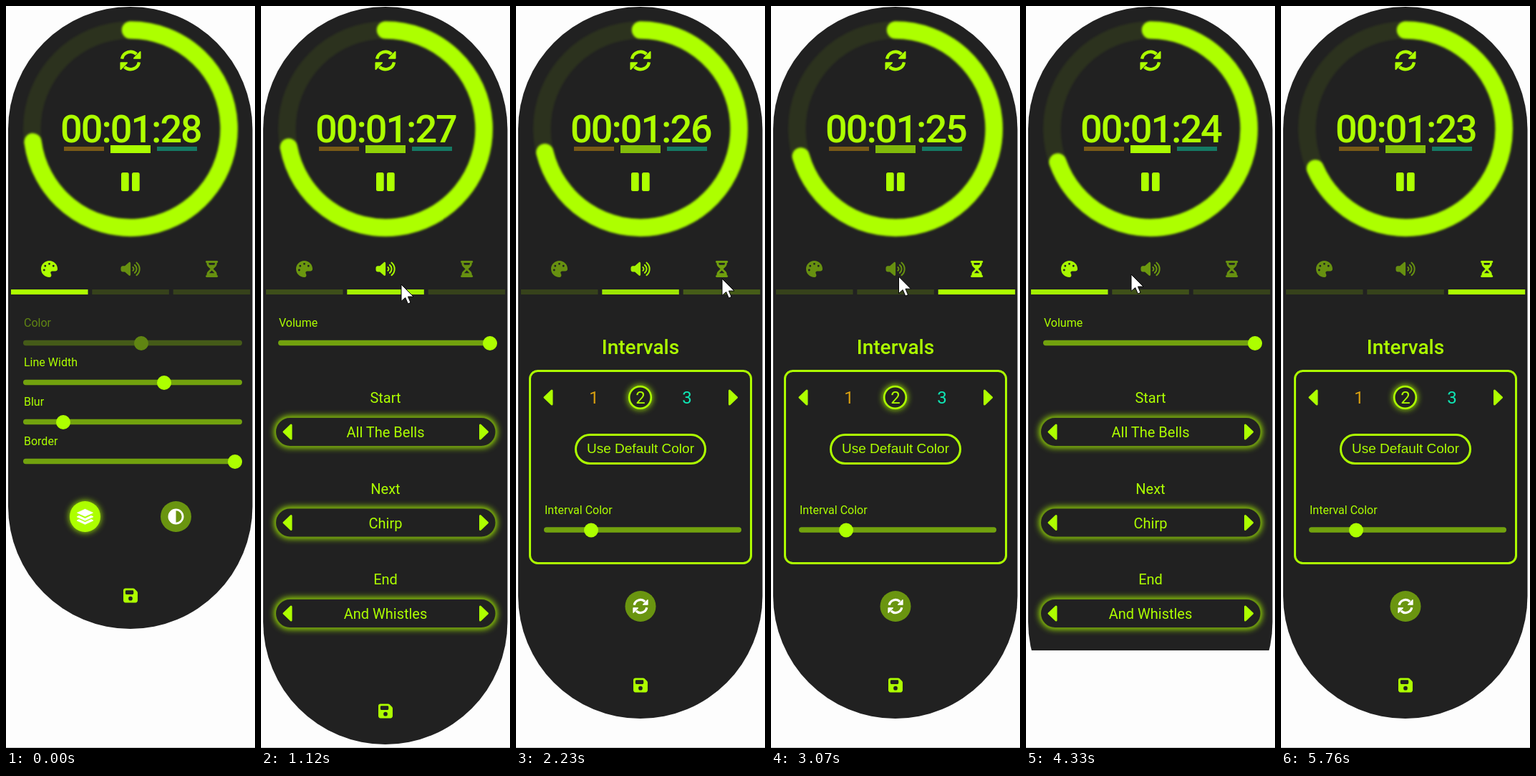
Write an HTML page that moves like this. It is 348 px wide and 1034 px high and loops after 5830 ms.

```html
<!DOCTYPE html>
<html lang="en">
<head>
<meta charset="utf-8">
<title>Interval timer</title>
<style>
html, body { margin: 0; width: 100%; height: 100%; overflow: hidden; background: #fdfdfd; }
svg { display: block; font: 16px Roboto, sans-serif; fill: #adff00; stroke: none; }
.dim { opacity: .52; }
.line { fill: none; stroke: #adff00; }
.mid { text-anchor: middle; font-size: 20px; }
.soft { filter: blur(1.8px); }
.glow { filter: drop-shadow(0 0 5px #adff00); }
</style>
</head>
<body>
<svg id="stage" width="348" height="1034" viewBox="0 0 348 1034"></svg>
<script>
const LOOP = 5830, FADE = 300;
const GREEN = '#adff00';

// Icons on a 512-unit grid
const half = `<path d="M-205-40A208 208 0 0 1 143-151" fill="none" stroke-width="76"/>
  <path d="M233-205V-55H83Z" stroke-width="30" stroke-linejoin="round"/>`;
const icons = {
  refresh: `<g transform="translate(256 256)">${half}<g transform="rotate(180)">${half}</g></g>`,
  palette: `<path fill-rule="evenodd" d="M512 256v3c0 36-34 61-70 61H344c-26 0-48 22-48 48 0 14 6 26 12 40
    6 14 12 27 12 42 0 32-22 61-53 62C115 514 0 397 0 256S115 0 256 0s256 115 256 256z` +
    [[96, 288], [128, 160], [256, 96], [384, 160]]
      .map(([x, y]) => `M${x - 32} ${y}a32 32 0 1 0 64 0a32 32 0 1 0-64 0z`).join('') + '"/>',
  volume: `<path stroke="none" d="M301 35c12 5 19 16 19 29V448c0 13-7 24-19 29s-25 3-35-5L132 352H64
    c-35 0-64-29-64-64V224c0-35 29-64 64-64H132L266 40c10-8 23-10 35-5z"/>` +
    [72, 167, 263].map(r => {
      const x = 352 + r * .627, y = r * .779;
      return `<path d="M${x} ${256 - y}A${r} ${r} 0 0 1 ${x} ${256 + y}" fill="none" stroke-width="48" stroke-linecap="round"/>`;
    }).join(''),
  hourglass: `<path stroke="none" fill-rule="evenodd" d="M32 0C14 0 0 14 0 32S14 64 32 64V75c0 42 17 83 47 113L147 256 79 324
    C49 354 32 395 32 437v11c-18 0-32 14-32 32s14 32 32 32H352c18 0 32-14 32-32s-14-32-32-32V437
    c0-42-17-83-47-113L237 256l68-68c30-30 47-71 47-113V64c18 0 32-14 32-32S370 0 352 0z
    M96 64H288V75c0 19-6 37-16 53H112c-10-16-16-34-16-53zM112 384l12-15 68-68 68 68 12 15z"/>`,
  save: `<path stroke="none" fill-rule="evenodd" d="M64 32C29 32 0 61 0 96V416c0 35 29 64 64 64H384c35 0 64-29 64-64V173
    c0-17-7-33-19-45L352 51c-12-12-28-19-45-19H64zM96 96H288q32 0 32 32V192q0 32-32 32H96q-32 0-32-32V128q0-32 32-32z
    M160 352a64 64 0 1 0 128 0a64 64 0 1 0-128 0z"/>`
};

const icon = (name, x, y, scale, color = GREEN) =>
  `<g transform="translate(${x} ${y}) scale(${scale})" fill="${color}" stroke="${color}" stroke-width="0">${icons[name]}</g>`;
const text = (s, x, y, attrs = '') => `<text x="${x}" y="${y}" ${attrs}>${s}</text>`;
const rect = (x, y, w, h, r = 0, attrs = '') =>
  `<rect x="${x}" y="${y}" width="${w}" height="${h}" rx="${r}" ${attrs}/>`;
const disc = (x, y, r, attrs = '') => `<circle cx="${x}" cy="${y}" r="${r}" ${attrs}/>`;
const arrow = (x, y, dir) =>
  `<path d="M${x} ${y}l${dir * 10}-9.5v19z" stroke="${GREEN}" stroke-width="3" stroke-linejoin="round"/>`;
const slider = (label, y, thumb, x = 24, w = 306) =>
  text(label, x + 1, y - 22.5) + rect(x, y - 3.7, w, 7.4, 3.7, 'class="dim" style="opacity:.58"') + disc(thumb, y + .5, 10);
const picker = (label, value, y) =>
  text(label, 174, y - 40.5, 'class="mid"') +
  `<g class="glow">${rect(20, y - 20.5, 308.5, 41, 20.5, 'fill="#212121" stroke="#689010" stroke-width="2"')}</g>` +
  arrow(32, y, 1) + arrow(316.5, y, -1) + text(value, 174, y + 7.5, 'class="mid"');

const layer = 'M-11.5.3L-8.5-1.2 0 2.8 8.5-1.2 11.5.3 0 5.6Z';
const lookPanel =
  `<g opacity=".45">${slider('Color', 469.5, 189)}</g>` +
  slider('Line Width', 524.5, 221) + slider('Blur', 579.5, 80) + slider('Border', 634.5, 320) +
  disc(110.5, 711.5, 21.5, 'class="glow"') + disc(237.5, 711.5, 21.5, 'class="dim"') +
  `<g transform="translate(110.5 711.5)" fill="#fff" stroke="#fff" stroke-width=".8" stroke-linejoin="round">
    <path d="M0-10.3L11-5.3 0-.3-11-5.3Z"/><path d="${layer}"/><path d="${layer}" transform="translate(0 5.2)"/></g>` +
  disc(237.5, 711.5, 9.6, 'fill="none" stroke="#fff" stroke-width="2.8"') +
  '<path d="M237.5 702a9.5 9.5 0 0 0 0 19z" fill="#fff"/>';

const soundPanel = slider('Volume', 469.5, 320) +
  picker('Start', 'All The Bells', 593.5) + picker('Next', 'Chirp', 720) + picker('End', 'And Whistles', 846.5);

const big = 'class="mid" style="font-size:24px"';
const intervalPanel =
  text('Intervals', 174, 485, 'class="mid" style="font-size:28px;font-weight:500"') +
  rect(19.5, 508.5, 309, 268, 11, 'class="line" stroke-width="3"') +
  arrow(40, 545.5, 1) + arrow(308.5, 545.5, -1) +
  text(1, 109, 554, big + ' fill="#d9a010"') + text(2, 174, 554, big) + text(3, 239, 554, big + ' fill="#0fe6b4"') +
  `<g class="glow">${disc(173.5, 545.5, 15.3, 'fill="#212121" stroke="#adff00" stroke-width="2.6"')}</g>` +
  text(2, 174, 554, big) +
  rect(83.5, 597.5, 181, 40, 20, 'class="line" stroke-width="3"') +
  text('Use Default Color', 174, 623, 'class="mid" style="font:19px Liberation Sans,Arial,sans-serif"') +
  slider('Interval Color', 730, 105, 39, 276) +
  disc(174, 836.5, 21.5, 'class="dim"') + icon('refresh', 163, 825.5, .043, '#fff');

const panels = [lookPanel, soundPanel, intervalPanel];
const bottoms = [868, 1029, 993];
const tabX = [7, 120.3, 233.7];
const tabIcons = [icon('palette', 49, 355, .045), icon('volume', 160.5, 355.5, .0425), icon('hourglass', 279, 355, .045)];

stage.innerHTML =
  rect(0, 1033, 348, 1, 0, 'fill="#c8c8c8"') +
  rect(3, 1, 341.5, 867, 170.7, 'id="body" fill="#212121"') +
  `<g class="soft line" stroke-width="24.5">${disc(174, 171.2, 137.7, 'opacity=".08"')}
    <path id="ring" stroke-linecap="round"/></g>` +
  icon('refresh', 159, 61, .0586) +
  text('', 76, 190, 'id="clock" style="font-size:54px;font-weight:500;letter-spacing:-2px"') +
  rect(81, 196, 56, 6, 0, 'fill="#7a5a16"') + rect(146, 194, 56, 11, 0, 'id="pulse"') +
  rect(211, 196, 56, 6, 0, 'fill="#147a64"') +
  rect(161, 232, 10.7, 26, 2.5) + rect(176, 232, 10.7, 26, 2.5) +
  tabX.map((x, i) => `<g id="tab${i}">${tabIcons[i]}</g>` +
    rect(x, 395, 107.5, 7, 0, `id="bar${i}" style="filter:blur(.6px)"`)).join('') +
  panels.map((p, i) => `<g id="panel${i}">${p}</g>`).join('') +
  `<g id="save">${icon('save', 164, -11.5, .0446)}</g>` +
  rect(0, 898, 348, 135, 0, 'id="cover" fill="#fdfdfd"') +
  `<path id="cursor" d="M0 0V16.5L4 13 6.6 19 9.2 17.9 6.7 12H12Z" fill="#fff" stroke="#000" stroke-width=".7"/>`;

const $ = id => document.getElementById(id);

// [time, tab] for each click
const clicks = [[-FADE, 0], [900, 1], [2210, 2], [3400, 0], [4320, 1], [5480, 2]];
// [time, x, y] of the pointer
const route = [[500, 350, 430], [860, 190, 390], [1120, 196, 388], [1500, 198, 388], [2100, 285, 381], [2230, 288, 380],
  [2800, 290, 382], [3350, 62, 372], [3630, 58, 371], [3850, 60, 372], [4330, 147, 374], [4700, 178, 378],
  [5170, 274, 376], [5480, 288, 374], [5650, 350, 380]];
const mix = (a, b, k) => a + (b - a) * k;
const ease = k => k * k * (3 - 2 * k);

function drawTimer(t) {
  const a = (262.4 - 2.79 * t / 1000) * Math.PI / 180, r = 137.7;
  $('ring').setAttribute('d', `M174 ${171.2 - r}A${r} ${r} 0 1 1 ${174 + r * Math.sin(a)} ${171.2 - r * Math.cos(a)}`);
  $('clock').textContent = '00:01:' + Math.ceil(27.85 - t / 1000);
  $('pulse').setAttribute('opacity', .84 + .15 * Math.cos((t + 20) / 880 * 2 * Math.PI));
}

function drawTabs(t) {
  const n = clicks.findLastIndex(c => c[0] <= t);
  const [start, tab] = clicks[n];
  const was = n ? clicks[n - 1][1] : tab;
  const k = 1 - (1 - Math.min(1, (t - start) / FADE)) ** 2;
  for (let i = 0; i < 3; i++) {
    const on = i === tab ? (was === tab ? 1 : k) : i === was ? 1 - k : 0;
    $('tab' + i).setAttribute('opacity', mix(.5, 1, on));
    $('bar' + i).setAttribute('opacity', mix(.15, 1, on));
    $('panel' + i).style.display = i === tab ? '' : 'none';
  }
  $('body').setAttribute('height', bottoms[tab] - 1);
  $('save').setAttribute('transform', `translate(0 ${bottoms[tab] - 46.5})`);
  // The window grows a moment after the taller panel appears
  $('cover').style.display = tab === 1 && t - start < 80 ? '' : 'none';
}

function drawCursor(t) {
  const i = route.findIndex(p => p[0] > t);
  $('cursor').style.display = i > 0 ? '' : 'none';
  if (i < 1) return;
  const [a, b] = [route[i - 1], route[i]];
  const k = ease((t - a[0]) / (b[0] - a[0]));
  $('cursor').setAttribute('transform', `translate(${mix(a[1], b[1], k)} ${mix(a[2], b[2], k)}) scale(1.42)`);
}

function frame() {
  const t = performance.now() % LOOP;
  drawTimer(t);
  drawTabs(t);
  drawCursor(t);
  requestAnimationFrame(frame);
}
frame();
</script>
</body>
</html>
```
